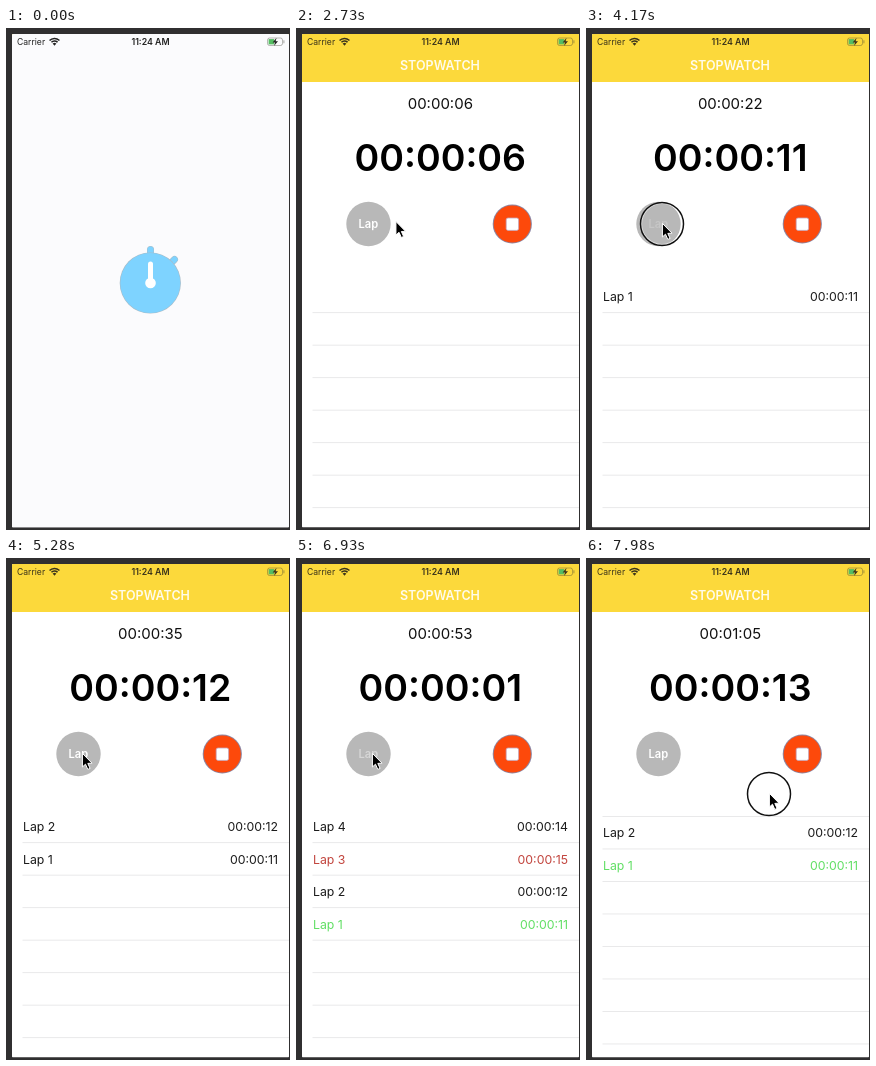
An HTML page with a canvas for the animation above (8000 ms loop, 284 by 502 pixels).

```html
<!DOCTYPE html>
<html lang="en">
<head>
<meta charset="utf-8">
<title>Stopwatch</title>
<style>
html, body { margin: 0; width: 100%; height: 100%; overflow: hidden; background: #302f30; }
canvas { display: block; width: 284px; height: 502px; }
</style>
</head>
<body>
<canvas id="stage"></canvas>
<script>
const W = 284, H = 502, LOOP = 8000;
const FONT = 'Inter, "Open Sans", sans-serif';
const START = 2150, RATE = 11.25 / 1000;
const LAP_MARKS = [11, 23, 38, 52];
const TABLE_TOP = 252, TABLE_END = 499, ROW = 32.5;

const canvas = document.getElementById('stage');
const c = canvas.getContext('2d');
const dpr = window.devicePixelRatio || 1;
canvas.width = W * dpr;
canvas.height = H * dpr;

const clamp = v => Math.max(0, Math.min(1, v));
const ease = v => v * v * (3 - 2 * v);
const lapTime = mark => START + (mark + 0.5) / RATE;

// Pointer stops: time, x, y
const STOPS = [
  [1170, 0, 436], [1440, 93, 267], [1620, 204, 204], [1780, 216, 200],
  [2330, 216, 200], [2760, 98, 193], [2900, 76, 195], [6980, 76, 195],
  [7290, 176, 354], [7440, 183, 375], [7540, 183, 375], [7960, 183, 235], [8000, 183, 235]
];
const DRAG = 7540;
const PRESSES = [
  [START - 110, START + 20],
  ...LAP_MARKS.map(m => [lapTime(m) - 110, lapTime(m) + 10]),
  [DRAG - 60, LOOP]
];

function pointerAt(t) {
  if (t < STOPS[0][0]) return null;
  const i = Math.max(1, STOPS.findIndex(s => s[0] >= t));
  const [t0, x0, y0] = STOPS[i - 1], [t1, x1, y1] = STOPS[i];
  const p = (t - t0) / (t1 - t0);
  const k = i < 3 ? p : ease(p);
  return { x: x0 + (x1 - x0) * k, y: y0 + (y1 - y0) * k };
}

function text(str, x, y, size, color, weight = 400, align = 'left') {
  c.font = `${weight} ${size}px ${FONT}`;
  c.textAlign = align;
  c.fillStyle = color;
  c.fillText(str, x, y);
}

function box(x, y, w, h, color) {
  c.fillStyle = color;
  c.fillRect(x, y, w, h);
}

function disc(x, y, r, color) {
  c.fillStyle = color;
  c.beginPath();
  c.arc(x, y, r, 0, 7);
  c.fill();
}

function line(x0, y0, x1, y1, width, color) {
  c.strokeStyle = color;
  c.lineWidth = width;
  c.beginPath();
  c.moveTo(x0, y0);
  c.lineTo(x1, y1);
  c.stroke();
}

function poly(points, color) {
  c.fillStyle = color;
  c.beginPath();
  points.forEach(([x, y]) => c.lineTo(x, y));
  c.closePath();
  c.fill();
}

function clock(n) {
  const pad = v => String(v).padStart(2, '0');
  return [Math.floor(n / 3600), Math.floor(n / 60) % 60, n % 60].map(pad).join(':');
}

function statusBar(ink) {
  text('Carrier', 11, 17, 8.6, ink);
  text('11:24 AM', 144.5, 17, 8.8, ink, 600, 'center');
  c.lineCap = 'butt';
  c.strokeStyle = ink;
  c.lineWidth = 1.5;
  for (const r of [4.2, 6.8]) {
    c.beginPath();
    c.arc(48.5, 17.2, r, -Math.PI * 0.76, -Math.PI * 0.24);
    c.stroke();
  }
  poly([[48.5, 17.8], [46.6, 15.6], [48.5, 14.8], [50.4, 15.6]], ink);
  c.strokeStyle = 'rgba(60,60,50,.45)';
  c.lineWidth = 0.8;
  c.beginPath();
  c.roundRect(261.5, 10, 15, 7.5, 2);
  c.stroke();
  box(262.6, 11.1, 5.6, 5.3, '#55bd62');
  box(277.4, 12.3, 1, 3, 'rgba(60,60,50,.45)');
  poly([[270.6, 9.8], [266.6, 14.4], [269, 14.4], [268, 18], [272, 13.2], [269.6, 13.2]], ink);
}

function splash() {
  box(6, 6, 277, 493.5, '#fbfbfd');
  const blue = '#7ed3ff';
  c.lineCap = 'round';
  for (const [width, color] of [[7, '#a9bcc8'], [6, blue]]) {
    line(144.5, 221.5, 144.5, 228, width, color);
    line(168.5, 231.5, 163, 237, width, color);
  }
  disc(144.3, 255, 30.6, '#a9bcc8');
  disc(144.3, 255, 30, blue);
  line(144.5, 236, 144.5, 255, 5, '#fff');
  disc(144.5, 255, 5.3, '#fff');
  statusBar('#222');
}

function lapButton(t) {
  let alpha = 1;
  for (const mark of LAP_MARKS) {
    const end = lapTime(mark);
    if (t >= end - 110 && t < end) alpha = 0.2;
    else if (t >= end) alpha = Math.min(1, 0.2 + 0.8 * (t - end) / 400);
  }
  disc(72.5, 196, 22.2, '#b8b8b8');
  text('Lap', 72.3, 200, 11.2, `rgba(255,255,255,${alpha})`, 600, 'center');
}

function runButton(running) {
  if (running) {
    disc(216.3, 196, 19.6, '#8c86a3');
    disc(216.3, 196, 18.6, '#fd490b');
    c.fillStyle = '#fff';
    c.strokeStyle = '#c3a5bb';
    c.lineWidth = 0.8;
    c.beginPath();
    c.roundRect(210.2, 190, 12.4, 12.4, 1.8);
    c.fill();
    c.stroke();
  } else {
    disc(216.5, 196.2, 19.3, '#72b52c');
    c.lineJoin = 'round';
    poly([[212, 189.6], [223.4, 196.3], [212, 203]], '#fff');
    c.strokeStyle = '#fff';
    c.lineWidth = 1.5;
    c.stroke();
  }
}

// Elastic pull past the end of a list that fits on screen
function scrollAt(t, pointer) {
  if (t < DRAG) return 0;
  const size = TABLE_END - TABLE_TOP, pull = 375 - pointer.y;
  return size * (1 - 1 / (pull * 0.55 / size + 1));
}

function table(total, scroll) {
  const times = LAP_MARKS.filter(m => total >= m).map((m, i) => m - (LAP_MARKS[i - 1] || 0));
  const low = Math.min(...times), high = Math.max(...times);
  c.save();
  c.beginPath();
  c.rect(6, TABLE_TOP, 277, TABLE_END - TABLE_TOP);
  c.clip();
  for (let i = 0; i < 10; i++) {
    const top = TABLE_TOP + i * ROW - scroll;
    box(16.5, top + ROW - 0.3, 266.5, 0.9, '#e7e7e8');
    const n = times.length - i;
    if (n < 1) continue;
    const value = times[n - 1];
    let color = '#1c1c1c';
    if (times.length > 2 && value === high) color = '#c2453e';
    if (times.length > 2 && value === low) color = '#62df65';
    text('Lap ' + n, 17, top + 21.2, 12.3, color);
    text(clock(value), 272, top + 21.2, 12.3, color, 400, 'right');
  }
  c.restore();
}

function app(t, pointer) {
  const total = t < START ? 0 : Math.floor((t - START) * RATE);
  const lapStart = Math.max(0, ...LAP_MARKS.filter(m => total >= m));
  box(6, 6, 277, 493.5, '#fff');
  box(6, 6, 277, 48, '#fcd93b');
  statusBar('#3a331b');
  text('STOPWATCH', 144, 42, 12.5, '#fffbea', 600, 'center');
  text(clock(total), 144.3, 81.3, 15, '#111', 400, 'center');
  text(clock(total - lapStart), 144.3, 143.3, 37.5, '#000', 600, 'center');
  lapButton(t);
  runButton(t >= START);
  table(total, scrollAt(t, pointer));
}

function drawPointer(t, { x, y }) {
  if (PRESSES.some(([from, to]) => t >= from && t < to)) {
    c.lineWidth = 1.2;
    c.strokeStyle = 'rgba(255,255,255,.55)';
    c.beginPath();
    c.arc(x, y + 1, 20.5, 0, 7);
    c.stroke();
    c.lineWidth = 1.5;
    c.strokeStyle = '#111';
    c.beginPath();
    c.arc(x, y + 1, 21.5, 0, 7);
    c.stroke();
  }
  c.save();
  c.translate(x + 0.4, y + 0.4);
  c.lineJoin = 'round';
  poly([[0, 0], [0, 13.6], [3.1, 10.8], [5.4, 16], [7.7, 15], [5.4, 10], [9.6, 9.8]], '#000');
  c.strokeStyle = '#fff';
  c.lineWidth = 1;
  c.stroke();
  c.restore();
}

function frame(now) {
  const t = now % LOOP;
  const pointer = pointerAt(t);
  const fade = 1 - clamp((t - 330) / 270);
  c.setTransform(dpr, 0, 0, dpr, 0, 0);
  box(0, 0, W, H, '#302f30');
  c.save();
  c.beginPath();
  c.roundRect(6, 6, 277, 493.5, 1);
  c.clip();
  app(t, pointer);
  if (fade > 0) {
    c.globalAlpha = fade;
    splash();
    c.globalAlpha = 1;
  }
  if (pointer) drawPointer(t, pointer);
  c.restore();
}

const origin = performance.now();
function tick() {
  frame(performance.now() - origin);
  requestAnimationFrame(tick);
}
tick();
</script>
</body>
</html>
```
